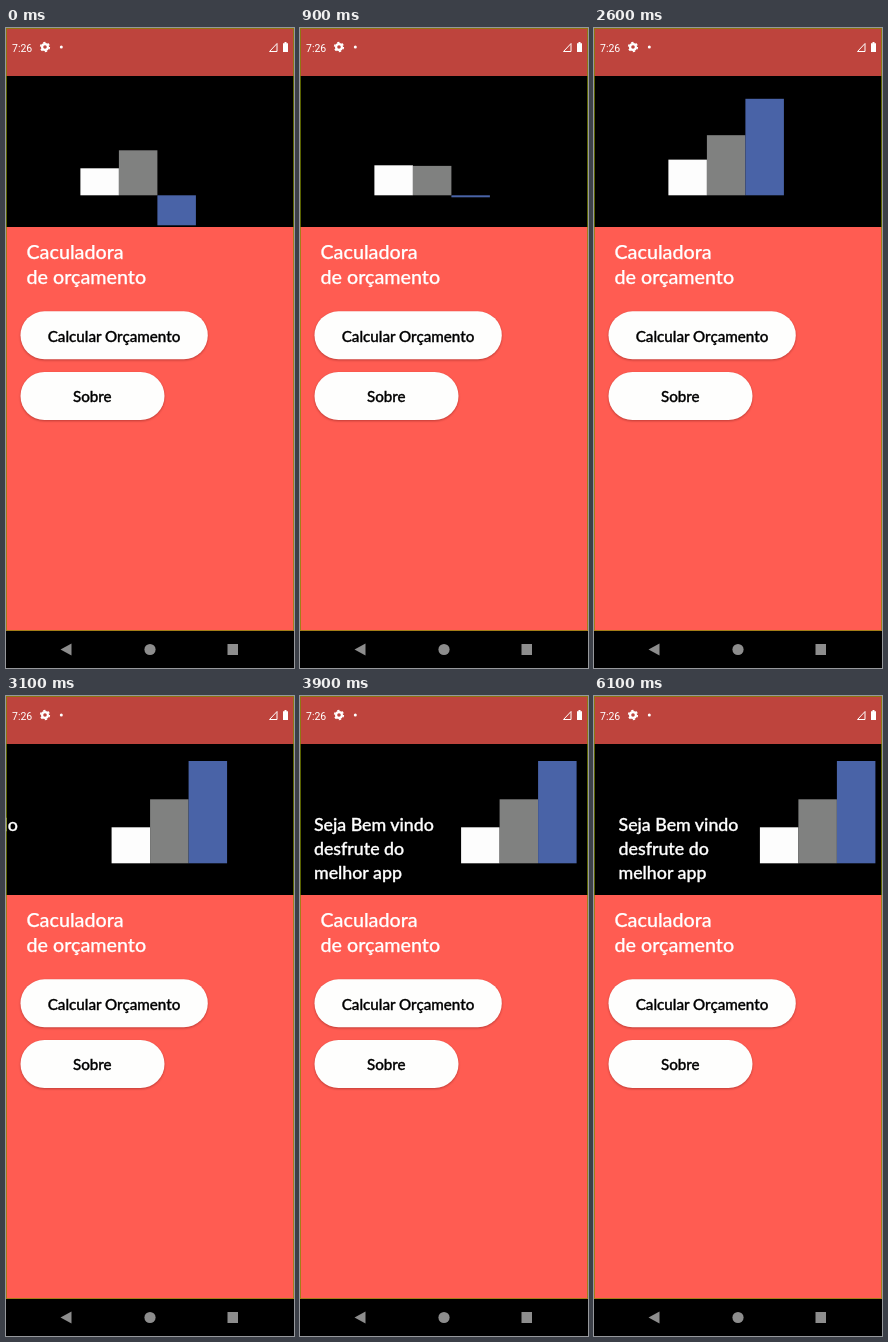
Recreate the animation shown at these times as an HTML page. Size 288 by 640 pixels, loop 6.2 s.

```html
<!DOCTYPE html>
<html lang="pt">
<head>
<meta charset="utf-8">
<title>Orçamento</title>
<style>
html, body { margin: 0; width: 100%; height: 100%; overflow: hidden; background: #000; }
svg { display: block; width: 288px; height: 640px; }
text { font-family: Lato, sans-serif; font-weight: 500; white-space: pre; }
.clock { font: 400 10.5px Roboto, sans-serif; }
.title { font-size: 19.7px; stroke: #fff; stroke-width: .25px; }
.label { font-size: 15.2px; stroke: #000; stroke-width: .35px; }
.hello { font-size: 17.8px; stroke: #fff; stroke-width: .35px; }
.shade { filter: drop-shadow(0 1px .8px rgba(70, 0, 0, .35)); }
</style>
</head>
<body>
<svg viewBox="0 0 288 640">
  <rect width="288" height="603" fill="#ff5c52"/>
  <rect width="288" height="48" fill="#be443d"/>
  <rect y="48" width="288" height="151"/>

  <g fill="#fff">
    <text class="clock" x="6" y="23.5">7:26</text>
    <circle cx="39" cy="19" r="2.9" fill="none" stroke="#fff" stroke-width="2.2"/>
    <circle cx="39" cy="19" r="4.4" fill="none" stroke="#fff" stroke-width="1.5" stroke-dasharray="2.3 2.308"/>
    <circle cx="55.3" cy="19" r="1.5"/>
    <path d="M263.5 23.5L271 15.5V23.5Z" fill="none" stroke="#fff"/>
    <path d="M277 15.2h1.5V14h2v1.2h1.5V24h-5Z"/>
  </g>

  <rect id="white" width="38.5" fill="#fdfdfd"/>
  <rect id="gray" width="38.5" fill="#808180"/>
  <rect id="blue" width="38.5" fill="#4963a7"/>

  <g id="hello" class="hello" fill="#fff">
    <text y="135">Seja Bem vindo</text>
    <text y="159">desfrute do</text>
    <text y="182.5">melhor app</text>
  </g>

  <g class="title" fill="#fff">
    <text x="20.5" y="230.7">Caculadora</text>
    <text x="20.5" y="256">de orçamento</text>
  </g>

  <g class="shade" fill="#fefefd">
    <rect x="14.5" y="283.3" width="187.3" height="48" rx="24"/>
    <rect x="14.5" y="344" width="144" height="48" rx="24"/>
  </g>
  <g class="label" text-anchor="middle">
    <text x="108" y="314">Calcular Orçamento</text>
    <text x="86.3" y="374">Sobre</text>
  </g>

  <rect x=".5" y=".5" width="287" height="602" fill="none" stroke="#7e8a00" stroke-opacity=".7"/>
  <rect y="603" width="288" height="37"/>
  <g fill="#8d8d8d">
    <path d="M54.5 621.5L65.5 615.5V627.5Z"/>
    <circle cx="144" cy="621.5" r="5.6"/>
    <rect x="221.5" y="616" width="10.5" height="11"/>
  </g>
</svg>
<script>
const LOOP = 6200, STEP = 100, BASE = 167.3, LEFT = 74.4, BAR = 38.5;
const SHIFT = 91.5, TEXT_X = 24.5, TEXT_RATIO = 2.2, GROWN = 2700;

const el = id => document.getElementById(id);
const ramp = (t, from, to) => Math.min(1, Math.max(0, (t - from) / (to - from)));
const easeOut = u => Math.sin(u * Math.PI / 2);

// Bar heights; a negative one hangs below the base line.
const bars = {
  white: t => 27 + 9 * ramp(t, 0, GROWN),
  gray: t => 45 - 26.5 * ramp(t, 0, 1530) + 45.5 * ramp(t, 1530, GROWN),
  blue: t => -30 + 28 * ramp(t, 0, 900) + 104.3 * ramp(t, 900, GROWN)
};

function draw(t) {
  const dx = SHIFT * easeOut(ramp(t, 2790, 4190));
  Object.entries(bars).forEach(([id, height], i) => {
    const h = height(t), bar = el(id);
    bar.setAttribute("x", LEFT + i * BAR + dx);
    bar.setAttribute("y", BASE - Math.max(h, 0));
    bar.setAttribute("height", Math.abs(h));
  });
  const x = TEXT_X - (SHIFT - dx) * TEXT_RATIO;
  el("hello").setAttribute("transform", `translate(${x} 0)`);
}

let start;
function tick(now) {
  start ??= now;
  const t = (now - start) % LOOP;
  draw(Math.floor(t / STEP + 0.02) * STEP % LOOP);
  requestAnimationFrame(tick);
}
draw(0);
requestAnimationFrame(tick);
</script>
</body>
</html>
```
